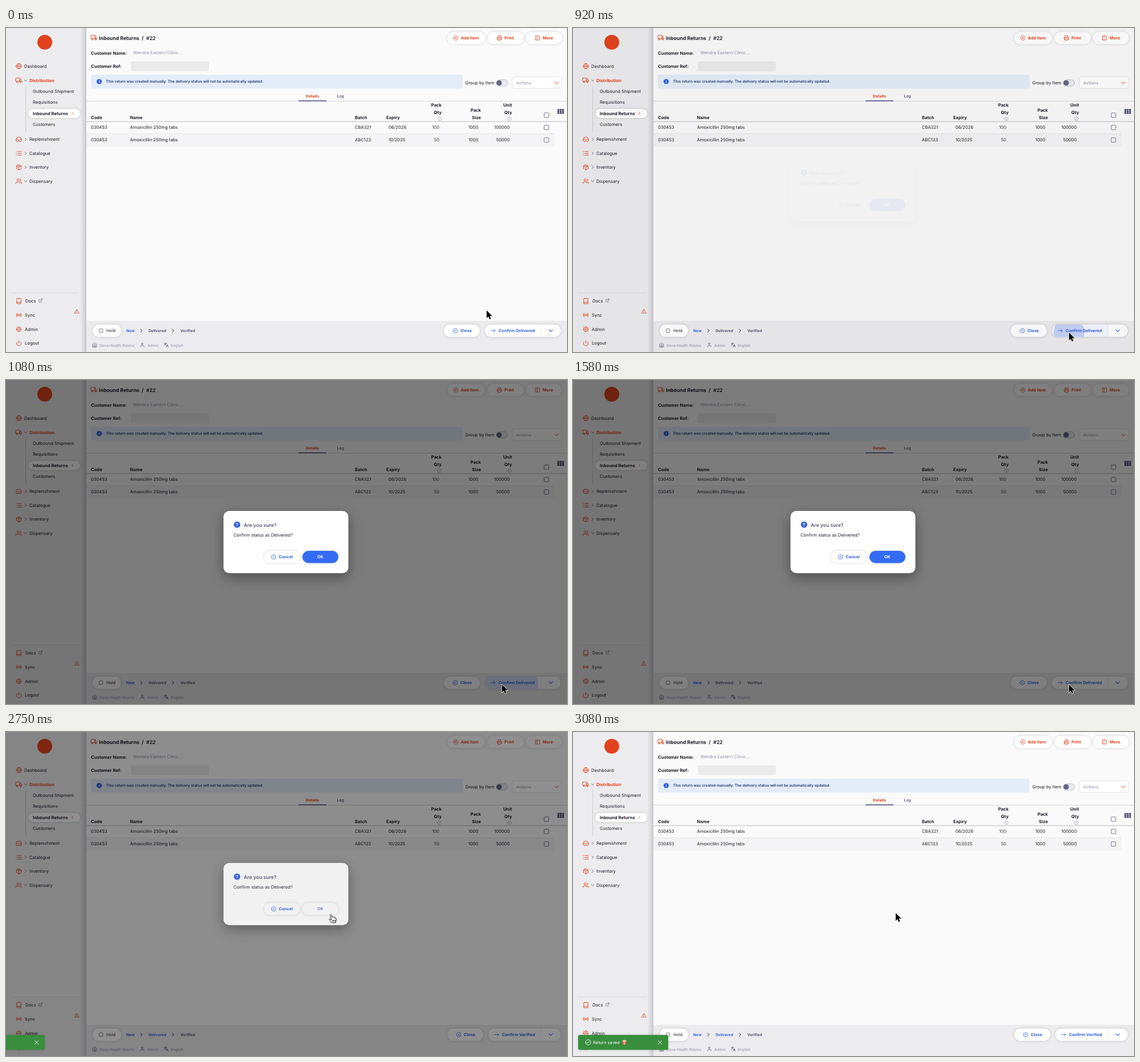
These frames come from a looping animation (984x569 px, 3.58 s). An HTML page:

```html
<!DOCTYPE html>
<html lang="en">
<head>
<meta charset="utf-8">
<title>Inbound return</title>
<style>
html, body { margin: 0; width: 100%; height: 100%; overflow: hidden; background: #fafafa; }
svg { display: block; }
text { font-family: Inter, "Open Sans", sans-serif; text-rendering: geometricPrecision; white-space: pre; }
.raised { filter: drop-shadow(0 .6px 2px rgba(40, 41, 61, .2)); }
.modal { filter: drop-shadow(0 7px 11px rgba(0, 0, 0, .38)); }
.icon { fill: none; stroke-linecap: round; stroke-linejoin: round; }
</style>
</head>
<body>
<script>
const RED = '#e2431e', BLUE = '#2f61e0', INK = '#1c1c28', SLATE = '#555770', GREY = '#8f90a6';

// Outline icons on a 24-unit grid
const disc = (x, y, r) => `M${x - r} ${y}a${r} ${r} 0 1 0 ${2 * r} 0a${r} ${r} 0 1 0 ${-2 * r} 0`;
const ring = disc(12, 12, 10);
const ICONS = {
  globe: ring + 'M2 12h20M12 2c6 6 6 14 0 20c-6-6-6-14 0-20',
  truck: 'M1 3h15v13H1zM16 8h4l3 3v5h-7z' + disc(5.5, 18.5, 2.5) + disc(18.5, 18.5, 2.5),
  inbox: 'M22 12h-6l-2 3h-4l-2-3H2M5.5 5 2 12v6a2 2 0 0 0 2 2h16a2 2 0 0 0 2-2v-6l-3.5-7a2 2 0 0 0-1.7-1H7.2a2 2 0 0 0-1.7 1z',
  list: 'M8 5h14M8 12h14M8 19h14M2 5h1M2 12h1M2 19h1',
  box: 'M21 17V7l-9-5-9 5v10l9 5zM3 7l9 5 9-5M12 22V12M7.5 4.5l9 5',
  users: 'M17 21v-2a4 4 0 0 0-4-4H5a4 4 0 0 0-4 4v2M23 21v-2a4 4 0 0 0-3-4M16 3a4 4 0 0 1 0 8' + disc(9, 7, 4),
  book: 'M4 19.5A2.5 2.5 0 0 1 6.5 17H20M6.5 2H20v20H6.5A2.5 2.5 0 0 1 4 19.5v-15A2.5 2.5 0 0 1 6.5 2z',
  radio: disc(12, 12, 2) + 'M16.2 7.8a6 6 0 0 1 0 8.4M7.8 16.2a6 6 0 0 1 0-8.4M19 5a10 10 0 0 1 0 14M5 19a10 10 0 0 1 0-14',
  gear: disc(12, 12, 3) + disc(12, 12, 8) + 'M12 1v3M12 20v3M1 12h3M20 12h3M4.2 4.2l2 2M17.8 17.8l2 2M4.2 19.8l2-2M17.8 6.2l2-2',
  power: 'M18.4 6.6a9 9 0 1 1-12.8 0M12 2v10',
  link: 'M18 13v6a2 2 0 0 1-2 2H5a2 2 0 0 1-2-2V8a2 2 0 0 1 2-2h6M15 3h6v6M10 14 21 3',
  alert: 'M12 3 1.5 21h21zM12 9v5M12 17v.5',
  plus: ring + 'M12 8v8M8 12h8',
  cancel: ring + 'M15 9l-6 6M9 9l6 6',
  info: ring + 'M12 16v-4M12 8v.2',
  check: ring + 'M7.5 12.5l3 3 6-7',
  print: 'M6 9V2h12v7M6 18H2V9h20v9h-4M6 14h12v8H6z',
  panel: 'M3 3h18v18H3zM9 3v18',
  arrow: 'M3 12h18M14 5l7 7-7 7',
  home: 'M3 9l9-7 9 7v13H3zM9 22V12h6v10',
  user: 'M20 21v-2a4 4 0 0 0-4-4H8a4 4 0 0 0-4 4v2' + disc(12, 7, 4),
  translate: 'M2 5h13M8 2v3M12 5c-1 5-5 8-10 10M5 8c1 3 4 5 7 7M12 22l5-12 5 12M14 18h6',
  right: 'M8 4l8 8-8 8',
  down: 'M4 8l8 8 8-8',
  close: 'M4 4l16 16M20 4 4 20'
};

const icon = (name, x, y, size = 11, color = RED, weight = 2) =>
  `<path class="icon" d="${ICONS[name]}" stroke="${color}" stroke-width="${weight}" transform="translate(${x - size / 2} ${y - size / 2}) scale(${size / 24})"/>`;

// y is the middle of the capitals
const text = (x, y, str, { s = 7.65, w = 400, c = INK, a = 'start', id = '' } = {}) =>
  `<text ${id && `id="${id}"`} x="${x}" y="${y + s * .364}" font-size="${s}" font-weight="${w}" fill="${c}" text-anchor="${a}">${str}</text>`;

const rect = (x, y, w, h, fill, r = 0, extra = '') =>
  `<rect x="${x}" y="${y}" width="${w}" height="${h}" rx="${r}" fill="${fill}" ${extra}/>`;

const pill = (x, y, w, h = 21.5) => rect(x, y, w, h, '#fff', h / 2, 'class="raised"');
const tick = (x, y, size = 8) => rect(x - size / 2, y - size / 2, size, size, 'none', 1.2, `stroke="${SLATE}" stroke-width=".8"`);
const bold = (x, y, str, o = {}) => text(x, y, str, { w: 700, ...o });
const label = (x, y, str, c, o = {}) => bold(x, y, str, { s: 7.2, c, ...o });

function sidebar() {
  const items = [
    ['globe', 32, 67, 'Dashboard'], ['inbox', 41, 195.5, 'Replenishment', 'right'],
    ['list', 41, 220, 'Catalogue', 'right'], ['box', 41, 244.5, 'Inventory', 'right'],
    ['users', 41, 269, 'Dispensary', 'down'], ['book', 34, 479.5, 'Docs'], ['radio', 33, 504, 'Sync'],
    ['gear', 33, 529, 'Admin'], ['power', 33, 553.5, 'Logout']
  ];
  return rect(0, 0, 141, 569, '#ececee') + rect(131, 0, 10, 569, 'url(#edge)') +
    `<circle cx="68" cy="25" r="13" fill="${RED}"/>` +
    items.map(([i, x, y, str, chev]) =>
      icon(i, 22.5, y) + text(x, y, str) + (chev ? icon(chev, 34.5, y, 7, SLATE, 3) : '')).join('') +
    icon('truck', 22.5, 92) + icon('down', 34.5, 92, 7, SLATE, 3) + bold(41, 92, 'Distribution', { c: RED }) +
    rect(34, 101, 1, 81, '#c9cad4') + pill(39.5, 142, 90.5, 16) +
    text(47, 111.5, 'Outbound Shipment') + text(47, 130.5, 'Requisitions') +
    bold(47, 150, 'Inbound Returns') + icon('right', 116.5, 150, 6, RED, 3) + text(47, 169, 'Customers') +
    rect(10, 465, 117, .8, '#d6d6dc') + icon('link', 60.5, 478.5, 7.5, SLATE) + icon('alert', 124, 497.5, 9);
}

function header() {
  return icon('truck', 154.5, 17) + bold(163, 17.5, 'Inbound Returns', { s: 8.75 }) +
    bold(238, 17.5, '/', { s: 8.75 }) + text(246, 17.5, '#22', { s: 8.75, w: 600 }) +
    [[774, 66, 'plus', 789, 'Add Item'], [845, 63, 'print', 865.5, 'Print'], [912, 63, 'panel', 932.5, 'More']]
      .map(([x, w, i, ix, str]) => pill(x, 6.8, w) + icon(i, ix, 17.5, 9.5) + label(ix + 8.8, 17.5, str, RED)).join('') +
    bold(149, 44.5, 'Customer Name:') + text(223, 43.5, 'Wendra Eastern Clinic...', { c: GREY }) +
    bold(149, 67.5, 'Customer Ref:') + rect(219, 58.5, 137, 17.5, '#ebebeb', 4) +
    rect(149, 82, 652, 24.3, '#e3edf9', 4) + `<circle cx="163.5" cy="94" r="4.6" fill="${BLUE}"/>` +
    rect(163, 93.3, 1.1, 3, '#fff') + rect(163, 91.3, 1.1, 1.1, '#fff') +
    text(175.5, 93.7, 'This return was created manually. The delivery status will not be automatically updated.', { s: 6.53, w: 600, c: '#1f3670' }) +
    text(805.5, 96.5, 'Group by Item') +
    rect(860, 91, 19.6, 11, '#ececef', 5.5, `stroke="${GREY}" stroke-width=".6"`) + `<circle cx="865" cy="96.5" r="4.7" fill="#63658a"/>` +
    rect(887.8, 85.8, 87, 20.4, '#fff', 4, 'stroke="#dddde5" stroke-width=".8"') +
    text(895, 96.7, 'Actions', { s: 7.45, c: GREY }) + icon('down', 965.5, 96.5, 10, RED, 2.4) +
    text(537.5, 119.7, 'Details', { s: 6.8, w: 700, c: RED, a: 'middle' }) +
    text(586.7, 119.7, 'Log', { s: 6.8, w: 600, c: SLATE, a: 'middle' }) +
    rect(141, 128, 843, .8, '#d0d0d8') + rect(513, 127.2, 49, 1.4, '#3f4478');
}

function table() {
  const end = { a: 'end' };
  const row = (y, batch, expiry, qty, units) =>
    text(149, y, '030453') + text(217.5, y, 'Amoxicillin 250mg tabs') + text(612, y, batch) +
    text(671, y, expiry) + text(760, y, qty, { ...end, c: '#3a3b4c' }) + text(828.5, y, '1000', end) + text(883.5, y, units, end) + tick(948, y);
  return rect(141, 163.6, 843, 1.6, '#d2d2d8') + rect(141, 186, 821, 22, '#f4f4f6') + rect(141, 185.4, 821, .8, '#e0e0e6') +
    [[149, 'Code'], [217.5, 'Name'], [612, 'Batch'], [667, 'Expiry']].map(([x, str]) => bold(x, 157.5, str)).join('') +
    [[764, 135.5, 'Pack', 'Qty'], [833, 144.5, 'Pack', 'Size'], [887.5, 135.5, 'Unit', 'Qty']]
      .map(([x, y, a, b]) => bold(x, y, a, end) + bold(x, y + 13, b, end)).join('') +
    icon('info', 760, 159.5, 8, GREY, 1.8) + icon('info', 883, 159.5, 8, GREY, 1.8) + tick(948, 153) +
    [967.3, 971.4, 975.5].map(x => rect(x, 142, 3.1, 9, SLATE)).join('') +
    row(174.7, 'CBA321', '06/2026', '100', '100000') + row(196.7, 'ABC123', '10/2025', '50', '50000');
}

function footer() {
  const step = (x, str, c, id) => bold(x, 531.5, str, { s: 6.65, c, id });
  const faint = { s: 6.6, c: GREY };
  return rect(141, 514, 843, 55, '#ececee') +
    pill(152, 520.8, 50) + tick(166.5, 531.5, 6.2) + text(176, 531.5, 'Hold', { s: 7.2 }) +
    step(211, 'New', BLUE) + icon('right', 237.5, 531.5, 8, INK, 3) + step(250, 'Delivered', SLATE, 'delivered') +
    icon('right', 293, 531.5, 8, INK, 3) + step(306, 'Verified', SLATE) +
    `<g id="closeBtn">${pill(768, 520.8, 63)}${icon('cancel', 788, 531.5, 9.5, BLUE)}${label(797, 531.5, 'Close', BLUE)}</g>` +
    rect(840, 520.8, 133, 21.5, '#fff', 10.75, 'id="confirm" class="raised"') +
    `<g clip-path="url(#half)"><rect id="tint" x="840" y="520" width="98" height="23" fill="${BLUE}" opacity="0"/><circle id="ripple" cx="870" cy="535" fill="${BLUE}"/></g>` +
    rect(938, 521, .7, 21, '#e4e4ea') + icon('down', 955.5, 531.5, 9.5, BLUE, 2.6) +
    `<g id="confirmText">${icon('arrow', 854.5, 531.5, 9.5, BLUE)}${label(864, 531.5, 'Confirm Delivered', BLUE, { id: 'confirmLabel' })}</g>` +
    icon('home', 155.5, 556.5, 9, SLATE) + text(164, 557.3, 'Dova Health Rooms', faint) +
    icon('user', 239, 556.5, 9, SLATE) + text(248, 557.3, 'Admin', faint) +
    icon('translate', 281, 556.5, 9, SLATE) + text(289, 557.3, 'English', faint);
}

function dialog() {
  const mid = { a: 'middle' };
  return rect(381.5, 230, 219, 109.3, '#fff', 10, 'class="modal"') +
    `<circle cx="405.3" cy="254" r="5.6" fill="${BLUE}"/>` + bold(405.3, 254, '?', { s: 8, c: '#fff', ...mid }) +
    text(417, 254.5, 'Are you sure?', { s: 8.65, w: 600, c: SLATE }) +
    text(399, 272.2, 'Confirm status as Delivered?') +
    pill(452.5, 300, 63) + icon('cancel', 469.3, 310.7, 9.5, BLUE) + label(478.5, 310.7, 'Cancel', BLUE) +
    pill(520, 300, 63) + label(551.3, 310.7, 'OK', BLUE, { ...mid, id: 'okText' }) +
    `<g id="okFill">${rect(520, 300, 63, 21.5, '#336bf3', 10.75)}${label(551.3, 310.7, 'OK', '#fff', mid)}</g>`;
}

function toast() {
  return rect(9, 532, 158, 26.3, '#388e3c', 3, 'class="raised"') + icon('check', 26.5, 545, 11, '#fff') +
    text(35, 545.2, 'Return saved', { c: '#fff', s: 7.55 }) +
    `<path d="M86 542.5l4-2 4 2-.8 6.2h-6.4z" fill="#d9694f"/><path d="M86 542.5l4-2 4 2-4 1.6z" fill="#f2d9c4"/><path d="M89.3 544h1.4v4.7h-1.4z" fill="#f6e6da"/>` +
    icon('close', 152.5, 545, 9.5, '#fff', 2.4);
}

document.body.innerHTML = `<svg width="984" height="569" viewBox="0 0 984 569">
  <defs>
    <linearGradient id="edge"><stop offset="0" stop-color="#555770" stop-opacity="0"/><stop offset="1" stop-color="#555770" stop-opacity=".24"/></linearGradient>
    <clipPath id="half"><path d="M938 520.8H850.75a10.75 10.75 0 0 0 0 21.5H938z"/></clipPath>
  </defs>
  ${rect(0, 0, 984, 569, '#fafafa')}${header()}${table()}${footer()}${sidebar()}
  ${rect(0, 0, 984, 569, '#000', 0, 'id="shade"')}
  <g id="dialog">${dialog()}</g><g id="toast">${toast()}</g>
  <g id="cursor">
    <path id="arrow" d="M0 0v13.6l3.1-2.9 2.1 4.9 2.4-1-2.1-4.8h4.3z" stroke="#fff" stroke-width="1.2" paint-order="stroke"/>
    <path id="hand" transform="translate(0 1)" d="M4.4 9 2.6 3.2C2.2 1.2 4.3.8 4.9 2.6L6.2 6.4C6.5 5.4 8.2 5.4 8.5 6.5 9 5.7 10.5 5.8 10.7 7 11.4 6.5 12.6 7 12.7 8.2L13 11.5 11.9 16H6L2.3 11.9C.4 10 .8 8.8 2.4 9.4L4.4 11zM7 11v3M9 11v3M11 11v3" fill="#fff" stroke="#000" stroke-width=".9" stroke-linejoin="round"/>
  </g>
</svg>`;

const $ = id => document.getElementById(id);
const set = (id, attr, value) => $(id).setAttribute(attr, value);
const clamp = v => Math.max(0, Math.min(1, v));

// Each track lists [tick, ...values]; values between are linear
function at(track, k) {
  const i = track.findIndex(p => p[0] > k);
  if (i < 0) return track.at(-1).slice(1);
  if (i === 0) return track[0].slice(1);
  const a = track[i - 1], b = track[i], u = (k - a[0]) / (b[0] - a[0]);
  return a.slice(1).map((v, j) => v + (b[j + 1] - v) * u);
}
const PATH = [[0, 843, 496], [1, 845, 499], [2, 851, 508], [3, 860, 521], [4, 866, 530], [5, 869, 534], [6, 870, 535],
  [19, 870, 535], [20, 869, 530], [21, 867, 517], [22, 800, 465], [23, 685, 394], [24, 613, 350], [25, 579, 329], [26, 569, 321], [27, 566, 318]];
const FADE = [[10, 0], [11, .06], [12, .78], [13, 1], [32, 1], [33, .88], [34, .2], [35, 0]];
const SLIDE = [[32, -180], [33, -99], [34, -26], [35, -3], [36, 0]];
const RIPPLE = [[9, 0, 0], [10, 8, .24], [11, 27, .24], [12, 51, .24], [13, 63, .2], [14, 75, .1], [15, 75, 0]];

const LOOP = 3580, RATE = 12;
function draw(now) {
  const k = Math.min(37, Math.floor((now % LOOP + 4) * RATE / 1000));
  const [x, y] = at(PATH, k), [fade] = at(FADE, k), [radius, alpha] = at(RIPPLE, k);
  const saved = k >= 33, shift = saved ? 6 : 0;
  const hand = k >= 3 && k <= 10 || k >= 26 && k <= 34;

  set('cursor', 'transform', `translate(${x} ${y})`);
  set('arrow', 'visibility', hand ? 'hidden' : 'visible');
  set('hand', 'visibility', hand ? 'visible' : 'hidden');
  set('shade', 'opacity', fade / 2);
  set('dialog', 'opacity', fade);
  set('toast', 'transform', `translate(${at(SLIDE, k)} 0)`);
  set('ripple', 'r', radius);
  set('ripple', 'opacity', alpha);
  set('tint', 'opacity', k >= 3 && k <= 12 ? .05 : 0);
  set('okFill', 'opacity', 1 - clamp((k - 25) / 3));
  set('okText', 'fill', k >= 32 ? '#7488cc' : BLUE);

  set('delivered', 'fill', saved ? BLUE : SLATE);
  set('closeBtn', 'transform', `translate(${shift} 0)`);
  set('confirmText', 'transform', `translate(${shift} 0)`);
  set('confirm', 'x', 840 + shift);
  set('confirm', 'width', 133 - shift);
  $('confirmLabel').textContent = saved ? 'Confirm Verified' : 'Confirm Delivered';
}

const start = performance.now();
(function tickLoop() {
  draw(performance.now() - start);
  requestAnimationFrame(tickLoop);
})();
</script>
</body>
</html>
```
